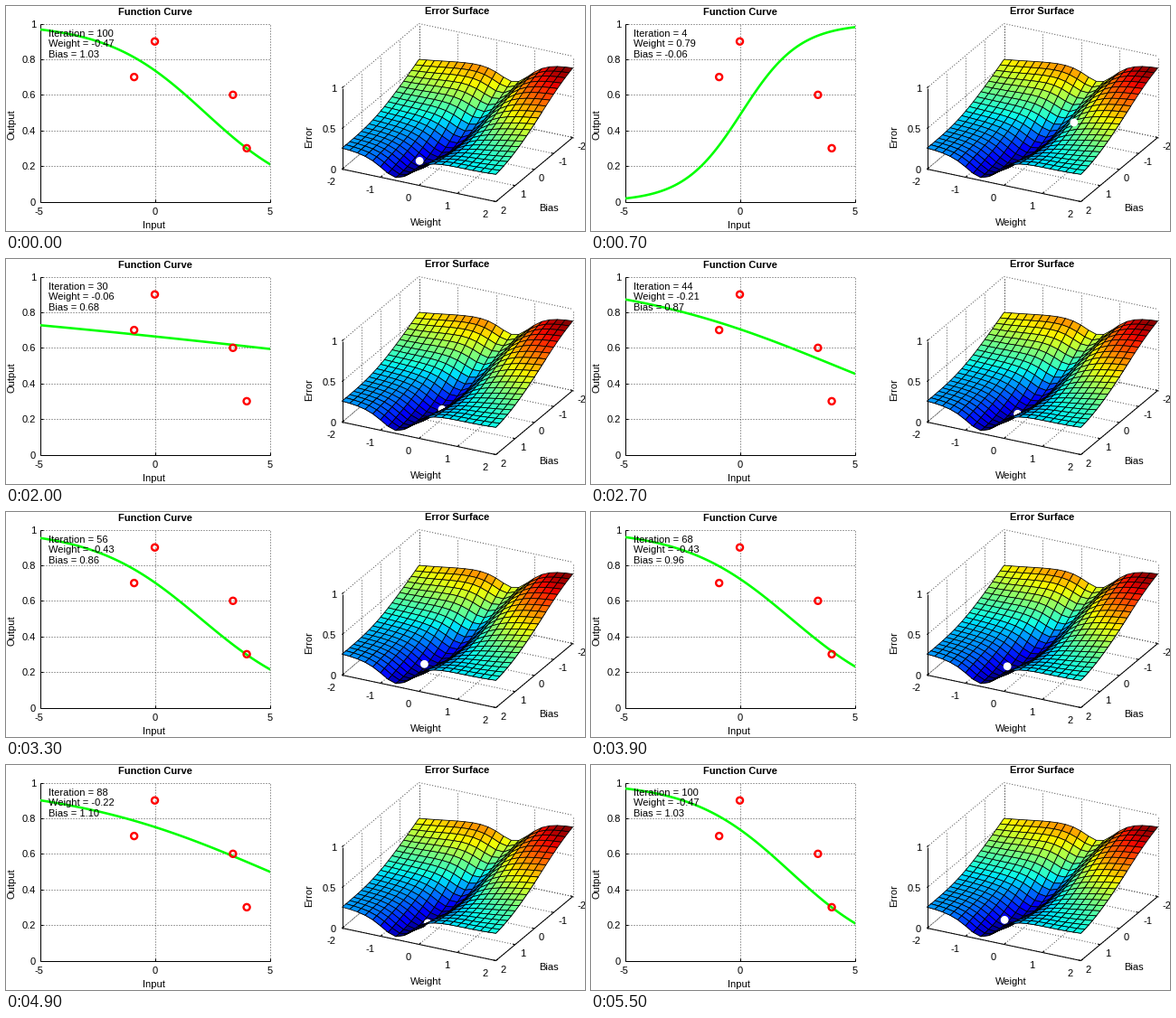
Recreate the animation shown at these times as a matplotlib script. Size 640x249 px, loop 6500 ms.

```python
import numpy as np
import matplotlib.pyplot as plt
from matplotlib.animation import FuncAnimation
from matplotlib.collections import LineCollection, PolyCollection
from matplotlib.patches import Circle, Rectangle

W, H, DPI = 640, 249, 100
PX = 72 / DPI
FONT = 11.1 * PX
CELLS = 20
BALL_LIFT = 12  # how far the ball is pulled towards the viewer when sorting
plt.rcParams["font.family"] = "Liberation Sans"

POINTS_X = np.array([-0.9, 0, 3.4, 4])
POINTS_Y = np.array([0.7, 0.9, 0.6, 0.3])
# (iteration, weight, bias) the training run passes through
WAYPOINTS = [(0, 1, 0), (12, -0.15, -0.10), (30, -0.06, 0.68), (44, -0.21, 0.87),
             (56, -0.43, 0.86), (78, -0.26, 1.06), (100, -0.47, 1.03)]


def sigmoid(v):
    return 1 / (1 + np.exp(-v))


def error(w, b):
    return 0.5 * sum((y - sigmoid(w * x + b)) ** 2 for x, y in zip(POINTS_X, POINTS_Y))


def descend(start, goal, steps, rng, tries=20000):
    """Stochastic gradient descent; keeps the run that ends nearest the goal."""
    picks = rng.integers(0, 4, (steps, tries))
    w, b = np.full(tries, start[0], float), np.full(tries, start[1], float)
    path = [(w, b)]
    for pick in picks:
        x, y = POINTS_X[pick], POINTS_Y[pick]
        out = sigmoid(w * x + b)
        delta = (y - out) * out * (1 - out)
        w, b = w + delta * x, b + delta
        path.append((w, b))
    best = np.argmin((w - goal[0]) ** 2 + (b - goal[1]) ** 2)
    path = np.array([(w[best], b[best]) for w, b in path])
    drift = np.linspace(0, 1, steps + 1)[:, None]
    return path + drift * (np.array(goal) - path[-1])


def train():
    rng = np.random.default_rng(4)
    path = [np.array([WAYPOINTS[0][1:]], float)]
    for (n0, *start), (n1, *goal) in zip(WAYPOINTS, WAYPOINTS[1:]):
        path.append(descend(start, goal, n1 - n0, rng)[1:])
    return np.vstack(path)


def plot_xy(x, y):
    return 37.5 + 25.4 * (x + 5), 216.5 - 197 * y


def project(w, b, z):
    x = 371.5 + 42.5 * (w + 2) + 21.25 * (2 - b)
    y = 180.5 + 9 * (w + 2) - 17.75 * (2 - b) - 90 * z
    return x, y


def depth(w, b, z):
    return 2.14 * (17.75 * (2 - b) - 9 * (w + 2)) - 42 * z


fig = plt.figure(figsize=(W / DPI, H / DPI), dpi=DPI, facecolor="white")
ax = fig.add_axes([0, 0, 1, 1])
ax.set_xlim(0, W)
ax.set_ylim(H, 0)
ax.axis("off")


def label(x, y, text, ha="center", **kw):
    return ax.text(x, y, text, ha=ha, va="center_baseline", fontsize=FONT, **kw)


def lines(segments, dotted=False):
    style = (0, (1, 2)) if dotted else "solid"
    ax.add_collection(LineCollection(segments, colors="0.3" if dotted else "black",
                                     linewidths=PX, linestyles=style,
                                     capstyle="butt", zorder=1))


def draw_curve_axes():
    grid = [[plot_xy(-5, v), plot_xy(5, v)] for v in np.arange(0.2, 1.1, 0.2)]
    grid += [[plot_xy(v, 0), plot_xy(v, 1)] for v in (0, 5)]
    lines(grid, dotted=True)
    solid = [[plot_xy(-5, 1), plot_xy(-5, 0)], [plot_xy(-5, 0), plot_xy(5, 0)]]
    for v in (-5, 0, 5):
        x, y = plot_xy(v, 0)
        solid.append([(x, y), (x, y - 3)])
        label(x - (v < 0), 227, str(v))
    for v in np.arange(0, 1.1, 0.2):
        x, y = plot_xy(-5, v)
        solid.append([(x, y), (x + 3, y)])
        label(33, y, f"{v:.1g}", ha="right")
    lines(solid)
    label(164.5, 6, "Function Curve", weight="bold")
    label(163, 242, "Input")
    label(6, 118.5, "Output", rotation=90)
    for x, y in zip(*plot_xy(POINTS_X, POINTS_Y)):
        ax.add_patch(Circle((x, y), 3.5, fill=False, ec="red", lw=2.4 * PX, zorder=6))


def draw_surface_axes():
    grid = []
    for v in (-2, -1, 0, 1, 2):
        grid += [[project(v, -2, 0), project(v, -2, 1)], [project(-2, v, 0), project(-2, v, 1)],
                 [project(v, -2, 0), project(v, 2, 0)], [project(-2, v, 0), project(2, v, 0)]]
    for z in (0, 0.5, 1):
        grid.append([project(-2, 2, z), project(-2, -2, z)])
        grid.append([project(-2, -2, z), project(2, -2, z)])
    lines(grid, dotted=True)
    corners = [project(-2, 2, 1), project(-2, 2, 0), project(2, 2, 0), project(2, -2, 0)]
    solid = list(zip(corners, corners[1:]))
    for v in (-2, -1, 0, 1, 2):
        x, y = project(v, 2, 0)
        solid.append([(x, y), (x + 2, y - 1.7)])
        label(x - 12, y + 13.5, str(v))
        x, y = project(2, v, 0)
        solid.append([(x, y), (x - 2.6, y - 0.6)])
        label(x + 5, y + 9, str(v), ha="left")
    for z in (0, 0.5, 1):
        x, y = project(-2, 2, z)
        solid.append([(x, y), (x + 2, y - 1.7)])
        label(365, y, f"{z:g}", ha="right")
    lines(solid)
    label(498.5, 5, "Error Surface", weight="bold")
    label(464.5, 239, "Weight")
    label(599.5, 222.5, "Bias")
    label(335.5, 136, "Error", rotation=90)


def build_surface():
    """Faces sorted back to front, with their depths and colours."""
    ticks = np.linspace(-2, 2, CELLS + 1)
    w, b = np.meshgrid(ticks, ticks)
    z = error(w, b)
    shade = (z - z.min()) / (z.max() - z.min())
    px, py = project(w, b, z)
    far = depth(w, b, z)
    faces = []
    for i in range(CELLS):
        for j in range(CELLS):
            ring = [(i, j), (i, j + 1), (i + 1, j + 1), (i + 1, j)]
            corners = [(px[k], py[k]) for k in ring]
            faces.append((np.mean([far[k] for k in ring]), corners, plt.cm.jet(shade[i, j])))
    faces.sort(key=lambda f: -f[0])
    return [np.array(part) for part in zip(*faces)]


def face_layer(verts, colors, zorder):
    layer = PolyCollection(verts, facecolors=colors, edgecolors="black",
                           linewidths=0.8 * PX, zorder=zorder)
    return ax.add_collection(layer)


draw_curve_axes()
draw_surface_axes()
path = train()
depths, verts, colors = build_surface()
face_layer(verts, colors, 2)
ball = ax.add_patch(Circle((0, 0), 4.4, color="white", lw=0, zorder=3))
front = face_layer(verts, colors, 4)

xs = np.linspace(-5, 5, 101)
curve, = ax.plot([], [], color="#00ff00", lw=2.6 * PX, zorder=5)
left, top = plot_xy(-5, 1)
curve.set_clip_path(Rectangle((left, top - 1.2), 254, 199.4, transform=ax.transData))
readout = [label(47, y, "", ha="left", zorder=7) for y in (29.5, 41.3, 53)]


def iteration_at(frame):
    if frame == 0:
        return 100
    return min(max(2 * (frame - 5), 0), 100)


def update(frame):
    n = iteration_at(frame)
    w, b = path[n]
    curve.set_data(*plot_xy(xs, sigmoid(w * xs + b)))
    z = error(w, b) + 0.015
    ball.center = project(w, b, z)
    near = depths < depth(w, b, z) - BALL_LIFT
    front.set_verts(verts[near])
    front.set_facecolor(colors[near])
    for line, text in zip(readout, (f"Iteration = {n}", f"Weight = {w:.2f}", f"Bias = {b:.2f}")):
        line.set_text(text)
    return [curve, ball, front, *readout]


anim = FuncAnimation(fig, update, frames=65, interval=100, repeat=True, repeat_delay=0)
plt.show()
```
